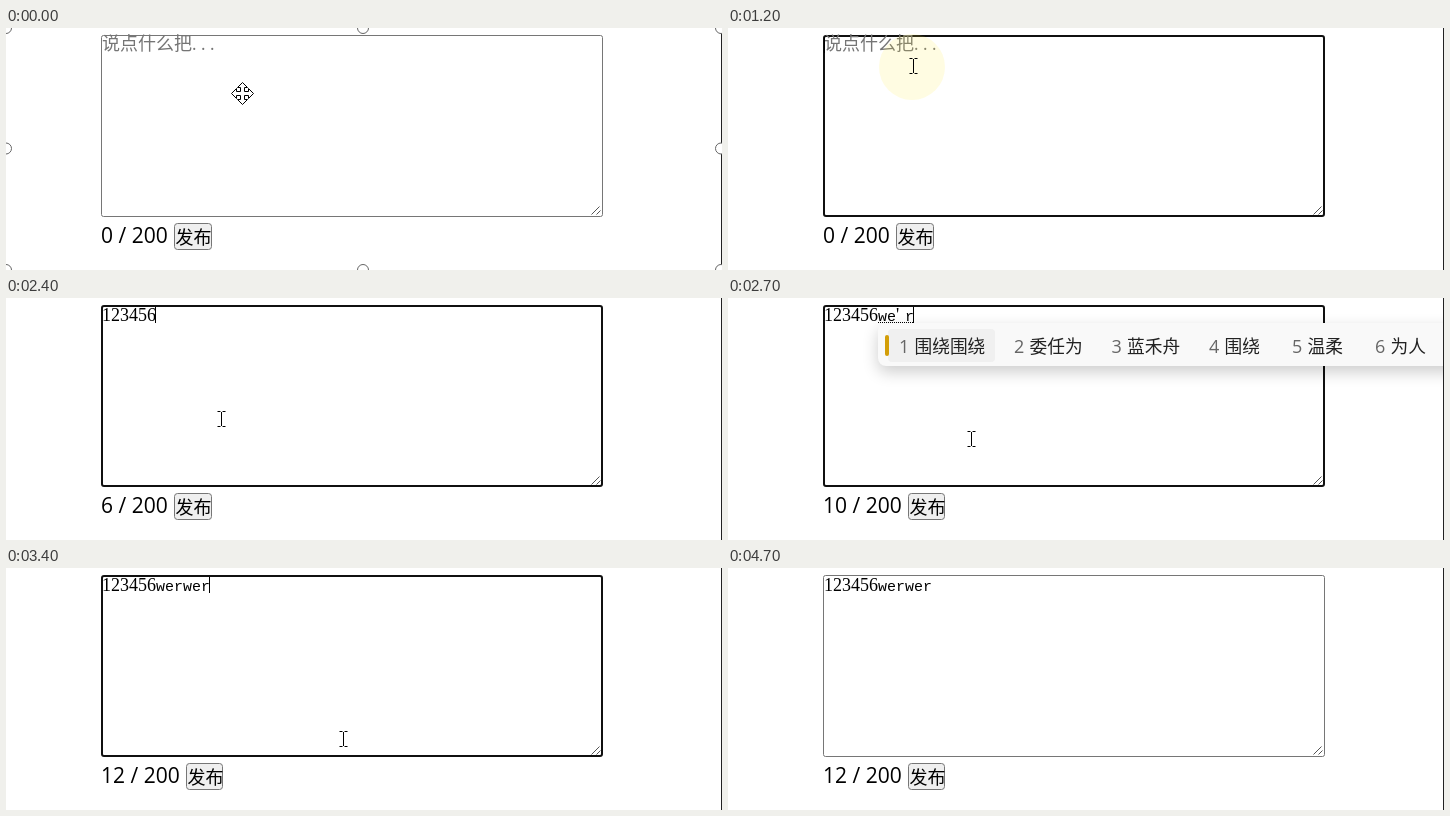
Write an HTML page with a canvas that moves like this. It is 716x242 px and loops after 5.4 s.

```html
<!DOCTYPE html>
<html lang="zh">
<head>
<meta charset="utf-8">
<style>
  html, body { margin: 0; width: 100%; height: 100%; overflow: hidden; background: #fff; }
  canvas { display: block; }
</style>
</head>
<body>
<canvas id="stage" width="716" height="242"></canvas>
<script>
const ctx = document.getElementById('stage').getContext('2d');
const LOOP = 5400, STEP = 100;
const CJK = '"Noto Sans CJK SC", "Noto Sans CJK", sans-serif';
const UI = '"Open Sans", "Noto Sans", sans-serif';
const SERIF = '18px "Liberation Serif", serif';
const MONO = '15px "Liberation Mono", monospace';

// [time, committed text, input method text]
const typing = [
  [0, '', ''], [1400, '1', ''], [1500, '123', ''], [1700, '1234', ''],
  [1900, '12345', ''], [2100, '123456', ''],
  [2500, '123456', 'w'], [2600, '123456', 'we'], [2700, '123456', "we'r"],
  [2800, '123456', "we'r'we"], [2900, '123456', "we'r'we'r"],
  [3100, '123456werwer', '']
];
// [time, x, y] of the pointer
const path = [
  [0, 236, 65], [300, 236, 65], [800, 200, 50], [1000, 185, 38], [1700, 185, 38],
  [2200, 193, 42], [2400, 215, 121], [2900, 262, 155], [3400, 337, 171],
  [4000, 506, 202], [4200, 197, 207], [4400, 197, 207], [4600, 164, 224]
];
const clicks = [[1000, 184, 39], [4200, 195, 207]];
const shortList = ['我', '为', '问', '无', '万', '网'];
const longList = ['围绕围绕', '委任为', '蓝禾舟', '围绕', '温柔', '为人'];

const lastBefore = (keys, t) => keys.filter(k => k[0] <= t).pop();

function pointerAt(t) {
  const i = path.findIndex(k => k[0] > t);
  if (i < 0) return path[path.length - 1].slice(1);
  const [t0, x0, y0] = path[i - 1], [t1, x1, y1] = path[i];
  const p = (t - t0) / (t1 - t0);
  return [Math.round(x0 + (x1 - x0) * p), Math.round(y0 + (y1 - y0) * p)];
}

function text(str, x, y, font, color = '#000') {
  ctx.font = font;
  ctx.fillStyle = color;
  ctx.fillText(str, x, y);
}

function box(x, y, w, h, r, fill, stroke, lineWidth = 1) {
  ctx.beginPath();
  ctx.roundRect(x, y, w, h, r);
  if (fill) { ctx.fillStyle = fill; ctx.fill(); }
  if (stroke) { ctx.strokeStyle = stroke; ctx.lineWidth = lineWidth; ctx.stroke(); }
}

function disc(x, y, r, fill, stroke) {
  ctx.beginPath();
  ctx.arc(x, y, r, 0, 7);
  ctx.fillStyle = fill;
  ctx.fill();
  if (stroke) { ctx.strokeStyle = stroke; ctx.lineWidth = 1; ctx.stroke(); }
}

function line(d, color = '#000') {
  ctx.strokeStyle = color;
  ctx.lineWidth = 1;
  ctx.stroke(new Path2D(d));
}

// Half-width characters sit in fixed cells of 9 px
function cells(str, x, y, color) {
  [...str].forEach((ch, i) => text(ch, x + 9 * i, y, /[a-z]/.test(ch) ? MONO : SERIF, color));
}

function textarea(t, focused, [typedAt, done, draft]) {
  if (focused) box(96, 8, 500, 180, 2, '#fff', '#101010', 2);
  else box(95.5, 7.5, 501, 181, 2, '#fff', '#767676');
  line('M585.5 186.5l8-8M590.5 186.5l4-4', '#555');

  const value = done + draft;
  if (!value) {
    text('说点什么把', 96, 22, '300 18px ' + CJK, '#757575');
    cells('...', 186, 22, '#757575');
  }
  cells(value, 96, 23);
  if (draft) {
    ctx.fillStyle = '#000';
    for (let x = 0; x < draft.length * 9; x += 2) ctx.fillRect(96 + done.length * 9 + x, 24, 1, 1);
  }
  const caretSince = Math.max(typedAt, 1000);
  if (focused && (t - caretSince) % 1060 < 530) {
    ctx.fillStyle = '#000';
    ctx.fillRect(96 + value.length * 9 - (value ? 1 : 0), 9, 1, 16);
  }
}

function footer(length, pressed) {
  text(length + ' / 200', 95, 215, '21px ' + UI);
  const x = length > 9 ? 180 : 168;
  box(x + .5, 195.5, 37 - (length > 9), 26, 3, pressed ? '#f5f5f5' : '#efefef', pressed ? '#8d8d8d' : '#767676');
  text('发布', x + 1.5, 215.5, '18px ' + CJK);
}

function candidates(words) {
  ctx.save();
  ctx.shadowColor = 'rgba(0,0,0,.2)';
  ctx.shadowBlur = 16;
  ctx.shadowOffsetY = 6;
  box(150, 25, 640, 43, 8, '#f9f9f9');
  ctx.restore();
  let x = 171;
  words.forEach((word, i) => {
    const pitch = Math.max(83, 45 + 17.5 * word.length);
    if (!i) {
      box(160, 31, pitch - 8, 33, 4, '#f0f0f0');
      box(157, 37, 4, 21, 2, '#d39e08');
    }
    text(i + 1, x, 55, '18px ' + UI, '#666');
    text(word, x + 15.5, 55, '17.7px ' + CJK, '#222');
    x += pitch;
  });
}

function halo(t, [start, x, y]) {
  const age = (t - start) / STEP;
  if (age < 0 || age > 3) return;
  const spread = start < 2000 ? age : Math.max(0, age - 1);
  if (spread > 2) return;
  ctx.globalAlpha = 1 - .43 * spread;
  disc(x, y, 20 + 6.5 * spread, '#fde535');
  ctx.globalAlpha = 1;
}

function pointer(t) {
  const [x, y] = pointerAt(t);
  ctx.save();
  ctx.translate(x, y);
  ctx.lineWidth = 1;
  ctx.strokeStyle = '#000';
  ctx.fillStyle = '#fff';
  if (t < 300) {
    ctx.translate(.5, .5);
    const shape = new Path2D();
    const arm = new Path2D('M-2 -2V-6H-5L0 -11L5 -6H2V-2');
    for (let i = 0; i < 4; i++) shape.addPath(arm, new DOMMatrix().rotate(90 * i));
    ctx.fill(shape);
    ctx.fillRect(-2, -2, 4, 4);
    ctx.stroke(shape);
  } else if (y < 189) {
    line('M-3.5 -7.5H-.5M1.5 -7.5H4.5M.5 -7V7M-3.5 7.5H-.5M1.5 7.5H4.5');
  } else {
    const arrow = new Path2D('M.5 .5V16.5L4.5 12.5L7 18.5L9.5 17.5L7 11.5H11.5Z');
    ctx.fill(arrow);
    ctx.stroke(arrow);
  }
  ctx.restore();
}

function handles() {
  for (const x of [0, 357, 715])
    for (const y of [0, 120.5, 242])
      if (x !== 357 || y !== 120.5) disc(x, y, 5.5, '#fff', '#666');
}

function draw(t) {
  ctx.fillStyle = '#fff';
  ctx.fillRect(0, 0, 716, 242);
  const state = lastBefore(typing, t);
  const [, done, draft] = state;
  textarea(t, t >= 1000 && t < 4200, state);
  footer(done.length + draft.length, t >= 4200 && t < 4400);
  if (draft) candidates(draft.length < 4 ? shortList : longList);
  ctx.fillStyle = '#222';
  ctx.fillRect(715, 0, 1, 242);
  if (t < 300) handles();
  clicks.forEach(click => halo(t, click));
  if (t < 4700) pointer(t);
}

function tick() {
  draw(Math.floor(performance.now() % LOOP / STEP) * STEP);
  requestAnimationFrame(tick);
}
tick();
</script>
</body>
</html>
```
